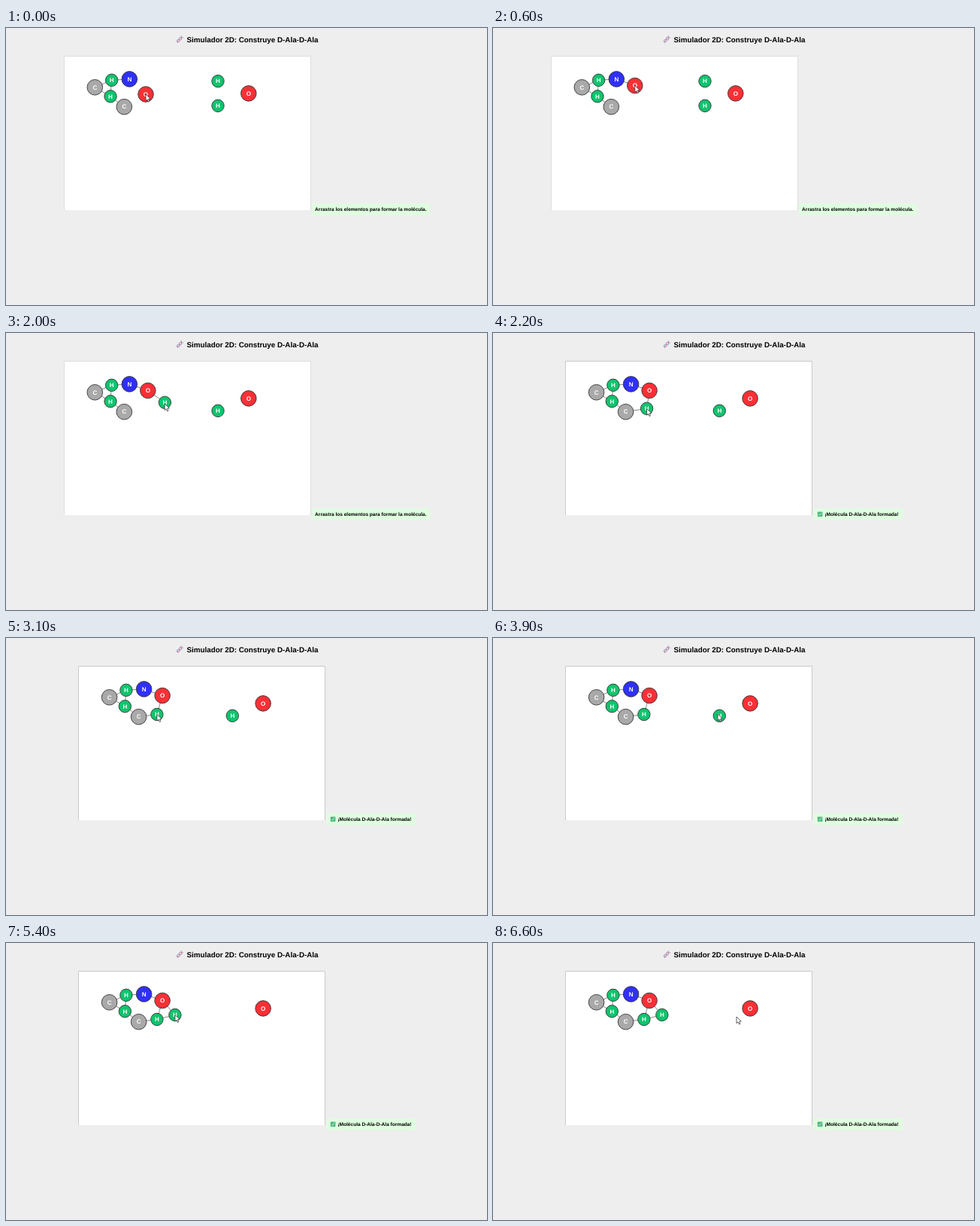
Animation of 640x368 px, one loop 6.7 s. Source, as an HTML page with a canvas:

```html
<!DOCTYPE html>
<html lang="es">
<head>
<meta charset="utf-8">
<title>Simulador 2D</title>
<style>
  html, body { margin: 0; width: 100%; height: 100%; overflow: hidden; background: #eee; }
  canvas { display: block; width: 640px; height: 368px; }
</style>
</head>
<body>
<canvas id="stage" width="640" height="368"></canvas>
<script>
const ctx = document.getElementById('stage').getContext('2d');
const LOOP = 6700, STEP = 100;
const FORMED_AT = 2200, SHIFT = 19.3, BOND_REACH = 28.7;
const FONT = '"Liberation Sans", Arial, sans-serif';

const KINDS = {
  C: { r: 10.3, fill: '#a9a9a9' },
  H: { r: 8.2, fill: '#0fc46e' },
  N: { r: 10.3, fill: '#3030fb' },
  O: { r: 10.3, fill: '#fb3036' }
};

const atom = (kind, x, y) => ({ kind, x, y });
const carbonyl = atom('O', 186, 88);
const upperH = atom('H', 282, 70.6);
const lowerH = atom('H', 282, 103.3);
const ATOMS = [
  atom('C', 118.3, 78.8), atom('H', 140.6, 69.3), atom('N', 164.3, 67.9),
  carbonyl, atom('H', 139, 90.8), atom('C', 157.3, 104.7),
  upperH, lowerH, atom('O', 322.8, 86.9)
];

// Pointer moves in board coordinates; a move with cargo drags that atom along.
const move = (from, until, x, y, cargo) => ({ from, until, x, y, cargo });
const MOVES = [
  move(0, 700, 188.8, 76.5, carbonyl),
  move(900, 1200, 262, 99),
  move(1200, 1400, 281.2, 76),
  move(1800, 2400, 181.6, 101.5, upperH),
  move(3300, 3500, 267.7, 109),
  move(3600, 3900, 279.7, 101),
  move(4100, 5400, 205.6, 95.5, lowerH),
  move(5700, 6300, 324.7, 92),
  move(6500, 6600, 304.7, 98)
];

const easeOut = k => 1 - (1 - k) ** 3;

function travel(start, moves, t) {
  return moves.reduce((p, m) => {
    const k = easeOut(Math.min(1, Math.max(0, (t - m.from) / (m.until - m.from))));
    return { x: p.x + (m.x - p.x) * k, y: p.y + (m.y - p.y) * k };
  }, { x: start.x, y: start.y });
}

function text(str, x, y, size, color = '#000', align = 'left') {
  ctx.font = `bold ${size}px ${FONT}`;
  ctx.textRendering = 'geometricPrecision';
  ctx.textAlign = align;
  ctx.fillStyle = color;
  ctx.fillText(str, x, y);
}

function line(points, color, width) {
  ctx.beginPath();
  points.forEach(([x, y]) => ctx.lineTo(x, y));
  ctx.strokeStyle = color;
  ctx.lineWidth = width;
  ctx.stroke();
}

function box(x, y, w, h, radius, color) {
  ctx.beginPath();
  ctx.roundRect(x, y, w, h, radius);
  ctx.fillStyle = color;
  ctx.fill();
}

function helix(x, y) {
  const strand = phase => Array.from({ length: 17 }, (_, i) => {
    const u = i / 8 - 1;
    return [u * 5, Math.sin(u * 4.4 + phase) * 1.8];
  });
  const a = strand(0.3), b = strand(0.3 + Math.PI);
  ctx.save();
  ctx.translate(x, y);
  ctx.rotate(-0.8);
  for (let i = 1; i < 17; i += 3) line([a[i], b[i]], '#cdbccf', 0.5);
  line(a, '#6f95bd', 0.9);
  line(b, '#cc7391', 0.9);
  ctx.restore();
}

function board(x, border) {
  box(x, 37.5, 328, 204.5, 0, '#fff');
  line([[x, 242], [x, 37.5], [x + 328, 37.5], [x + 328, 242]], border, 1);
}

function message(formed) {
  const y = 243.1, size = 6.55;
  if (!formed) {
    box(407.3, 233, 156.6, 15.5, 2, '#e0fde0');
    text('Arrastra los elementos para formar la molécula.', 411.1, y, size);
    return;
  }
  box(426.8, 233, 118.4, 15.5, 2, '#e0fde0');
  box(431.8, 237.5, 6.6, 6.6, 0.8, '#4fb783');
  line([[433.2, 240.9], [434.6, 242.4], [437, 239]], '#d5f2e0', 0.9);
  text('¡Molécula D-Ala-D-Ala formada!', 441.4, y, size);
}

function drawAtom({ kind, x, y }) {
  const { r, fill } = KINDS[kind];
  ctx.beginPath();
  ctx.arc(x, y, r, 0, Math.PI * 2);
  ctx.fillStyle = fill;
  ctx.fill();
  ctx.strokeStyle = '#333';
  ctx.lineWidth = 0.9;
  ctx.stroke();
  text(kind, x, y + 2.7, 8.1, '#fff', 'center');
}

function drawCursor({ x, y }) {
  const shape = [[0, 0], [0, 8.6], [2, 6.9], [3.4, 10], [4.9, 9.4], [3.6, 6.3], [6.3, 6]];
  ctx.beginPath();
  shape.forEach(([dx, dy]) => ctx.lineTo(x + dx, y + dy));
  ctx.closePath();
  ctx.fillStyle = '#fff';
  ctx.fill();
  ctx.strokeStyle = '#222';
  ctx.lineWidth = 0.7;
  ctx.stroke();
}

function drawMolecule(t) {
  const atoms = ATOMS.map(a => ({
    kind: a.kind,
    ...travel(a, MOVES.filter(m => m.cargo === a), t)
  }));
  atoms.forEach((a, i) => atoms.slice(i + 1).forEach(b => {
    if (Math.hypot(a.x - b.x, a.y - b.y) < BOND_REACH) {
      line([[a.x, a.y], [b.x, b.y]], '#888', 1);
    }
  }));
  atoms.forEach(drawAtom);
  drawCursor(travel(carbonyl, MOVES, t));
}

function draw(t) {
  const formed = t >= FORMED_AT;
  box(0, 0, 640, 368, 0, '#eee');
  helix(231, 15.2);
  text('Simulador 2D: Construye D-Ala-D-Ala', 240.5, 18.7, 9.82);
  board(formed ? 96.5 : 77.5, formed ? '#cacaca' : '#dedede');
  message(formed);

  ctx.save();
  ctx.translate(formed ? SHIFT : 0, 0);
  drawMolecule(t);
  ctx.restore();
}

const start = performance.now();
function tick() {
  const t = (performance.now() - start) % LOOP;
  draw(Math.floor(t / STEP) * STEP);
  requestAnimationFrame(tick);
}
tick();
</script>
</body>
</html>
```
